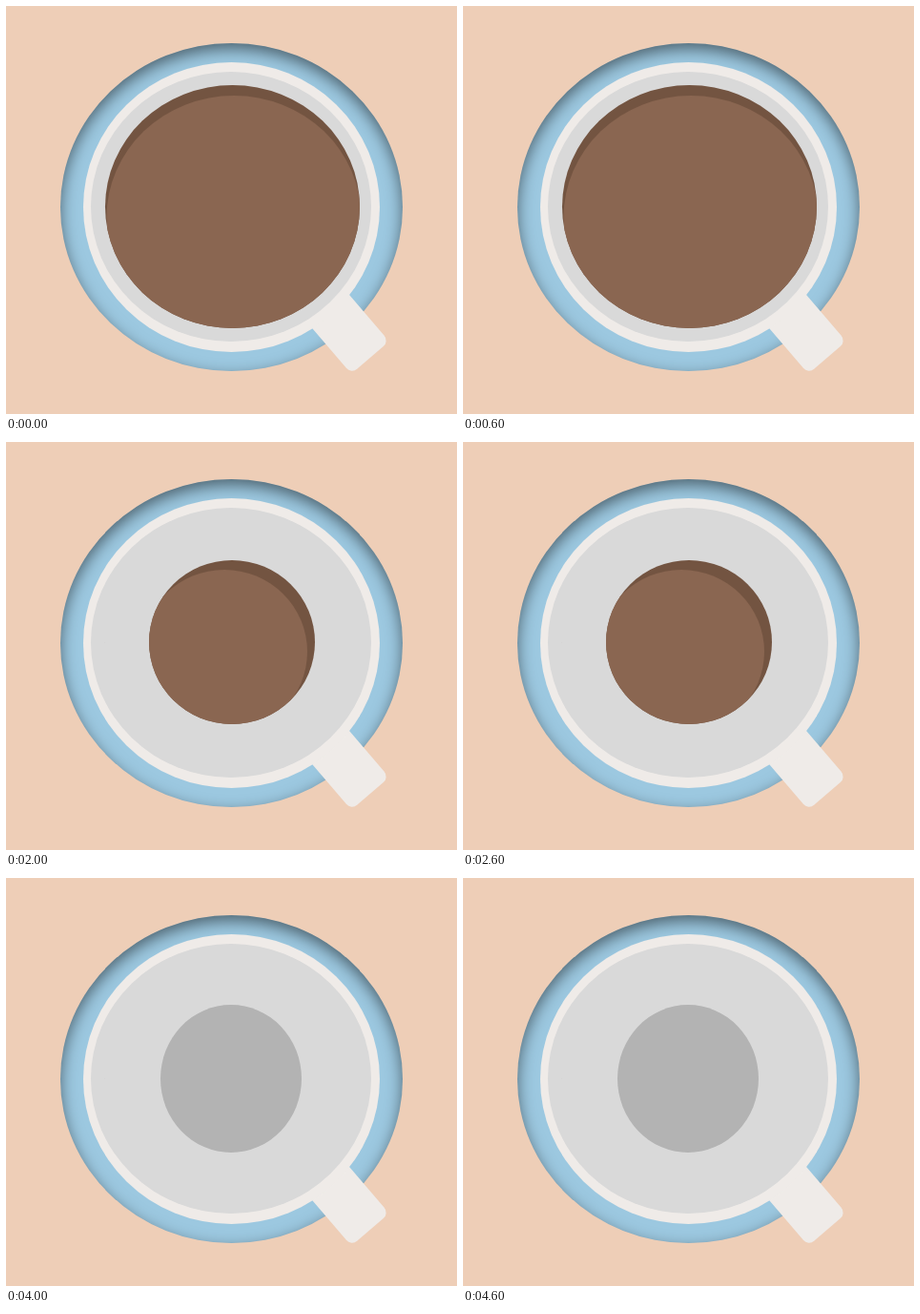
Recreate the animation shown at these times as an HTML page. Size 473 px wide and 428 px high, loop 5 s.

```html
<!DOCTYPE html>
<html lang="en">
<head>
<meta charset="utf-8">
<title>Emptying cup</title>
<style>
  html, body { margin: 0; width: 100%; height: 100%; overflow: hidden; background: #eeceb7; }
  .saucer {
    position: absolute; left: 57px; top: 39px; width: 359px; height: 344px;
    border-radius: 50%; background: #9cc8e0;
    box-shadow: inset 0 6px 16px rgba(0, 0, 0, .5);
  }
  svg { position: absolute; left: 0; top: 0; }
</style>
</head>
<body>
<div class="saucer"></div>
<svg width="473" height="428" viewBox="0 0 473 428">
  <defs><clipPath id="surface"><ellipse id="edge"/></clipPath></defs>
  <rect x="-16" width="79" height="52.4" rx="8" fill="#efebe8" transform="translate(361 304) rotate(49.5)"/>
  <ellipse cx="236.5" cy="211" rx="155.5" ry="152" fill="#efebe8"/>
  <ellipse cx="236" cy="210.5" rx="147" ry="141.5" fill="#d9d9d9"/>
  <ellipse id="pool"/>
  <g clip-path="url(#surface)"><ellipse id="light" fill="#8a6651"/></g>
</svg>
<script>
  const STEP = 1000;
  const COFFEE = '#735441';
  // Ellipses as [cx, cy, rx, ry]; no light means the cup is empty.
  const levels = [
    { pool: [237.5, 210.5, 133.5, 127.5], light: [239, 221.5, 133.5, 127.5] },
    { pool: [235.5, 213.5, 110.5, 107.5], light: [230, 227.5, 110.5, 107.5] },
    { pool: [237, 210, 87, 86], light: [229, 220, 87, 86] },
    { pool: [237, 210, 69, 71], light: [235.3, 214.5, 66, 65.5] },
    { pool: [236, 210.5, 74, 77.5], light: null }
  ];
  const [edge, pool, light] = ['edge', 'pool', 'light'].map(id => document.getElementById(id));

  function place(el, shape) {
    ['cx', 'cy', 'rx', 'ry'].forEach((name, i) => el.setAttribute(name, shape[i]));
  }

  let shown = -1;
  function draw(time) {
    const step = Math.floor(time / STEP) % levels.length;
    if (step === shown) return;
    shown = step;
    const level = levels[step];
    place(pool, level.pool);
    place(edge, level.pool);
    place(light, level.light || [0, 0, 0, 0]);
    pool.setAttribute('fill', level.light ? COFFEE : '#b3b3b3');
  }

  const start = performance.now();
  function tick() {
    draw(performance.now() - start);
    requestAnimationFrame(tick);
  }
  tick();
</script>
</body>
</html>
```
